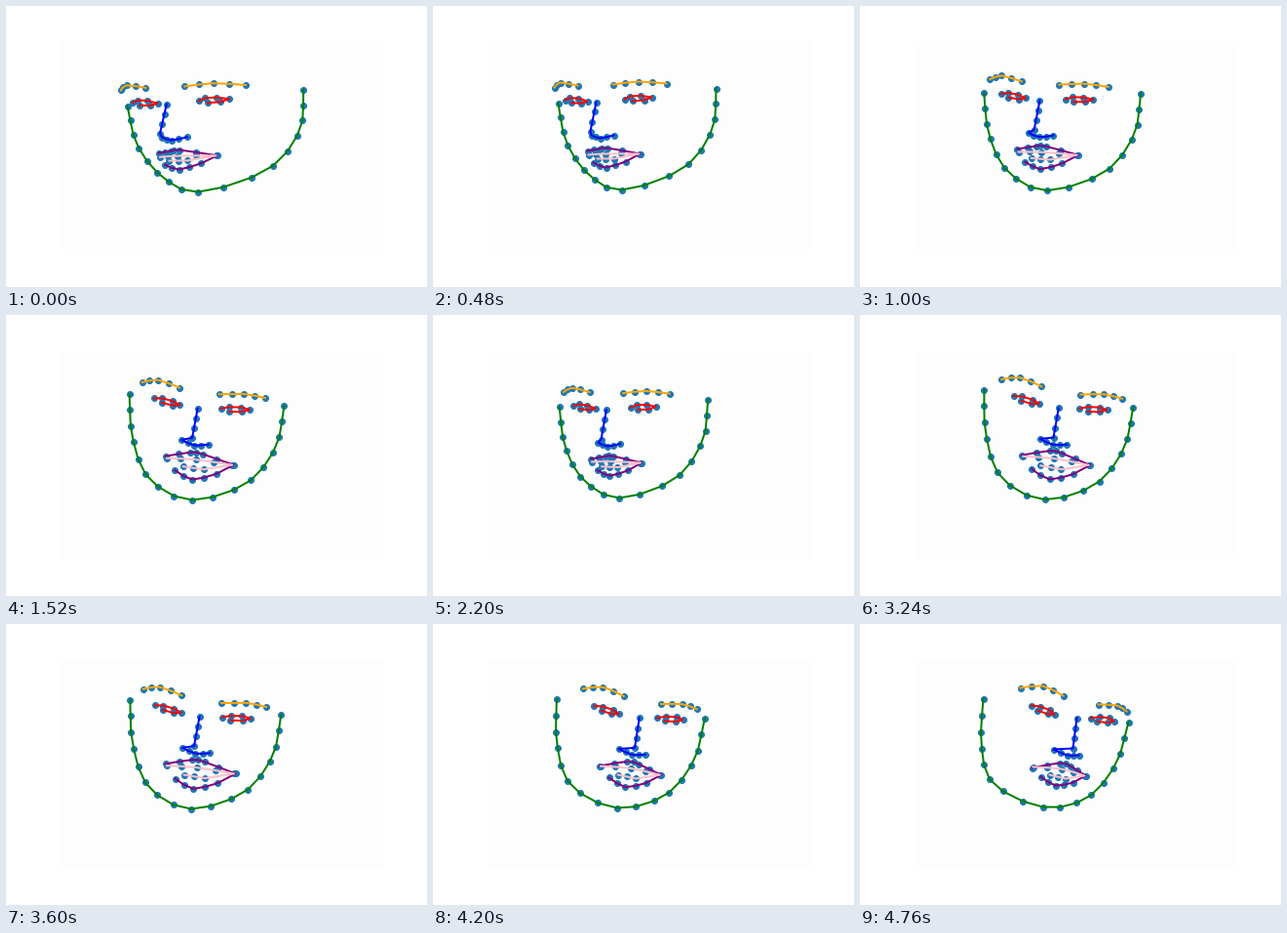
Recreate the animation shown at these times as a matplotlib script. Size 432 by 288 pixels, loop 4800 ms.

```python
import numpy as np
import matplotlib.pyplot as plt
from matplotlib.animation import FuncAnimation
from matplotlib.patches import Rectangle

W, H, DPI = 432, 288, 72
FRAMES, STEP = 120, 40

# Point count and line colour: jaw, brows, nose, eyes, outer lips, inner lips
PARTS = [(17, "green"), (5, "orange"), (5, "orange"), (9, "blue"),
         (6, "red"), (6, "red"), (12, "purple"), (8, "pink")]
ENDS = np.cumsum([count for count, _ in PARTS])
JAW, EYES_NOSE, MOUTH = slice(0, 17), slice(17, 48), slice(48, 68)


def curve(knots, n):
    """Place n points evenly along a smooth curve through the knots."""
    k = np.array(knots, float)
    slope = np.gradient(k, axis=0)
    u = np.linspace(0, len(k) - 1, n)
    i = np.minimum(u.astype(int), len(k) - 2)
    t = (u - i)[:, None]
    return (k[i] + (k[i + 1] - k[i]) * t * t * (3 - 2 * t)
            + slope[i] * t * (1 - t) ** 2 - slope[i + 1] * t * t * (1 - t))


def eye(outer, inner, lean):
    """Corner, upper lid, corner, lower lid; lean slides the upper lid along."""
    along = np.array([0, 0.2 + 0.2 * lean, 0.58 + 0.24 * lean, 1, 0.72, 0.29])
    lid = 2.5 * np.array([0, -1, -1, 0, 1, 1])
    start, end = np.array(outer, float), np.array(inner, float)
    points = start + (end - start) * along[:, None]
    points[:, 1] += lid
    return points


def face(jaw, brows, bridge, nostrils, eyes, lips, inner, lean):
    return np.vstack([
        curve(jaw, 17),
        *(curve(brow, 5) for brow in brows),
        curve(bridge, 4), curve(nostrils, 5),
        *(eye(*corners, lean) for corners in eyes),
        curve(lips[0], 7), curve(lips[1], 5),
        curve(inner[0], 5), curve(inner[1], 3),
    ])


LEFT = face(
    jaw=[(129, 100), (137, 139), (159, 172), (194, 189), (257, 167), (287, 127), (291, 85)],
    brows=([(125, 84), (131, 79), (149, 82)], [(185, 81), (211, 78), (240, 80)]),
    bridge=[(168, 99), (162, 129)],
    nostrils=[(163, 133), (172, 136), (186, 133)],
    eyes=([(136, 97), (159, 98)], [(197, 96), (225, 94)]),
    lips=([(159, 149), (171, 147), (179, 146), (213, 152)], [(198, 160), (178, 166), (165, 161)]),
    inner=([(160, 153), (177, 152), (212, 152)], [(186, 157), (169, 157)]),
    lean=0)

RIGHT = face(
    jaw=[(127, 77), (125, 123), (137, 164), (188, 188), (233, 179), (263, 144), (276, 101)],
    brows=([(165, 66), (188, 64), (209, 74)], [(245, 83), (264, 84), (274, 90)]),
    bridge=[(223, 97), (219, 128)],
    nostrils=[(199, 129), (213, 135), (225, 135)],
    eyes=([(176, 84), (200, 93)], [(237, 97), (261, 100)]),
    lips=([(177, 148), (205, 143), (216, 146), (232, 156)], [(219, 163), (201, 166), (186, 157)]),
    inner=([(178, 147), (207, 149), (231, 156)], [(211, 159), (195, 155)]),
    lean=1)

# Time in ms, head turn (0 left, 1 right), smile, sideways stretch
TRACK = np.array([
    (0, -0.05, 0, 1),
    (480, 0, 0, 0),
    (1120, 0.38, 0.5, 0.2),
    (1520, 0.51, 0.8, 0.2),
    (2200, 0.2, 0, -0.4),
    (2880, 0.76, 0, -0.2),
    (3360, 0.6, 1.2, 0),
    (3600, 0.55, 1, 0),
    (4760, 1, 0, 0),
])


def face_at(ms):
    turn, smile, stretch = (np.interp(ms, TRACK[:, 0], col) for col in TRACK.T[1:])
    points = LEFT + (RIGHT - LEFT) * turn
    x, y = points.T.copy()

    # A smile lifts the left side, spreads the features and opens the mouth
    fade = np.minimum((168 - y) / 40, 1)
    points[:, 1] -= smile * 0.09 * np.maximum(225 - x, 0) * fade
    points[EYES_NOSE, 0] += smile * 0.13 * (x[EYES_NOSE] - 192)
    points[MOUTH] += smile * 0.32 * (np.column_stack([x, y])[MOUTH] - (184, 155))

    points[:, 0] += stretch * 0.11 * (points[:, 0] - 165)
    points[:, 1] += stretch * 2
    return points


fig = plt.figure(figsize=(W / DPI, H / DPI), dpi=DPI, facecolor="white")
ax = fig.add_axes([0, 0, 1, 1])
ax.set_xlim(0.5, W + 0.5)
ax.set_ylim(H + 0.5, 0.5)
ax.axis("off")

ax.add_patch(Rectangle((56, 37.5), 332, 213, color="#fdfdfd", lw=0, zorder=0))
dots = ax.scatter(LEFT[:, 0], LEFT[:, 1], s=36, color="#1f77b4", zorder=1)
lines = [ax.plot([], [], color=color, lw=2, zorder=2)[0] for _, color in PARTS]


def draw(frame):
    points = face_at(frame * STEP)
    dots.set_offsets(points)
    for line, part in zip(lines, np.split(points, ENDS[:-1])):
        line.set_data(part[:, 0], part[:, 1])
    return [dots, *lines]


anim = FuncAnimation(fig, draw, frames=FRAMES, interval=STEP, repeat=True,
                     repeat_delay=0, blit=False)
plt.show()
```
